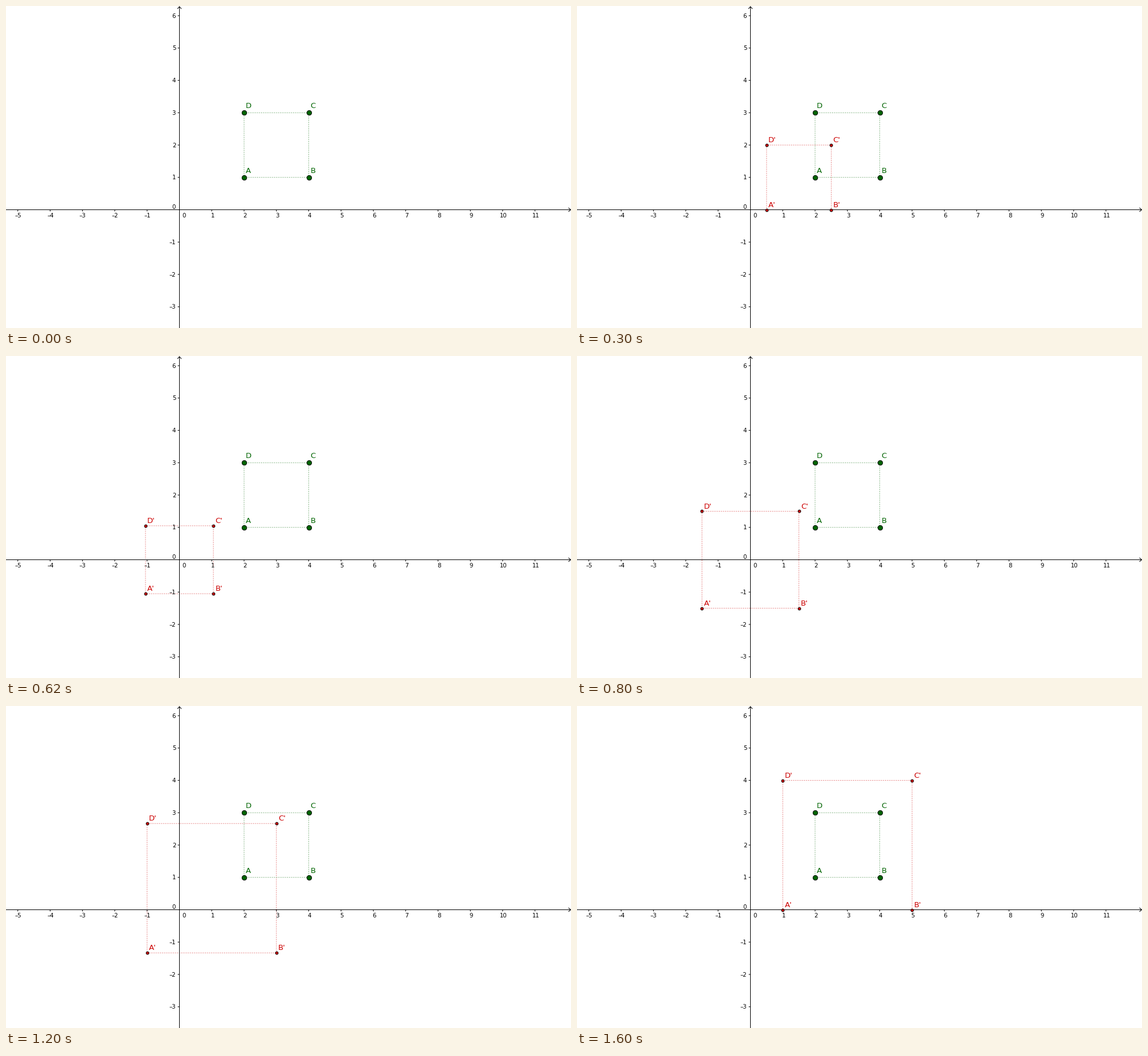
Recreate the animation shown at these times as a matplotlib script. Size 992 by 565 pixels, loop 1620 ms.

```python
import matplotlib.pyplot as plt
from matplotlib.animation import FuncAnimation

W, H, DPI = 992, 565, 100
PX = 72 / DPI                     # points per pixel
OX, OY, UNIT = 304.5, 357.5, 56.75
GREEN, RED = "#006400", "#cc0000"
FRAMES, STEP_MS = 81, 20

plt.rcParams["font.family"] = "DejaVu Sans"
fig = plt.figure(figsize=(W / DPI, H / DPI), dpi=DPI, facecolor="white")
ax = fig.add_axes([0, 0, 1, 1])
ax.set_xlim(0, W)
ax.set_ylim(H, 0)
ax.axis("off")


def to_px(x, y):
    return OX + UNIT * x, OY - UNIT * y


def stroke(xs, ys, width=1.0):
    ax.plot(xs, ys, color="black", lw=width * PX, zorder=3, snap=False,
            solid_capstyle="butt", solid_joinstyle="miter")


def number(x, y, n, ha):
    ax.text(x, y, str(n).replace("-", "\u2013"), fontsize=10.2 * PX,
            ha=ha, va="baseline", color="black", zorder=3)


def draw_axes():
    stroke([0, W - 0.5], [OY, OY])
    stroke([OX, OX], [1, H])
    stroke([W - 4.5, W - 0.5, W - 4.5], [OY - 3.5, OY, OY + 3.5])
    stroke([OX - 3.5, OX, OX + 3.5], [5, 1, 5])
    for n in range(-5, 12):
        x = to_px(n, 0)[0]
        if n:
            stroke([x, x], [OY, OY + 3])
        shift = 7.8 if n == 0 else 1.5 if n > 0 else 0.5
        number(x + shift, 371, n, "center")
    for n in range(-3, 7):
        y = to_px(0, n)[1]
        if n:
            stroke([OX - 3, OX], [y, y])
        number(298.2, y + (-1.5 if n == 0 else 3.7), n, "right")


class Square:
    """Dotted square with four labelled corner points."""

    def __init__(self, color, mark, size, lift, z):
        self.lift = lift
        self.sides = [ax.plot([], [], color=color, lw=0.85 * PX, zorder=z,
                              dashes=(1 / 0.85, 2.3 / 0.85), snap=False,
                              dash_capstyle="butt")[0] for _ in range(4)]
        self.dots, = ax.plot([], [], "o", ms=size * PX, mfc=color,
                             mec="black", mew=0.9 * PX, zorder=z + 3,
                             snap=False)
        self.names = [ax.text(0, 0, c + mark, color=color, fontsize=13.2 * PX,
                              va="baseline", zorder=z + 3) for c in "ABCD"]
        self.parts = [*self.sides, self.dots, *self.names]

    def place(self, cx, cy, half):
        corners = [to_px(cx + half * i, cy + half * j)
                   for i, j in ((-1, -1), (1, -1), (1, 1), (-1, 1))]
        for k, (x, y) in enumerate(corners):
            x2, y2 = corners[(k + 1) % 4]
            self.sides[k].set_data([x, x2], [y, y2])
            self.names[k].set_position((x + 3.2, y - self.lift))
        self.dots.set_data(*zip(*corners))

    def show(self, on):
        for part in self.parts:
            part.set_visible(on)


def pose(i):
    """Slide to the origin, double in size, slide back."""
    if i <= 30:
        away, half = 1 - i / 30, 1
    elif i <= 50:
        away, half = 0, 1 + (i - 30) / 20
    else:
        away, half = (i - 50) / 30, 2
    return 3 * away, 2 * away, half


draw_axes()
fixed = Square(GREEN, "", 8.4, 7.8, 2)
fixed.place(3, 2, 1)
image = Square(RED, "'", 4.9, 4.8, 1)


def update(i):
    image.place(*pose(i))
    image.show(i > 0)
    return image.parts


anim = FuncAnimation(fig, update, frames=FRAMES, interval=STEP_MS,
                     repeat=True, repeat_delay=0, blit=False)
plt.show()
```
